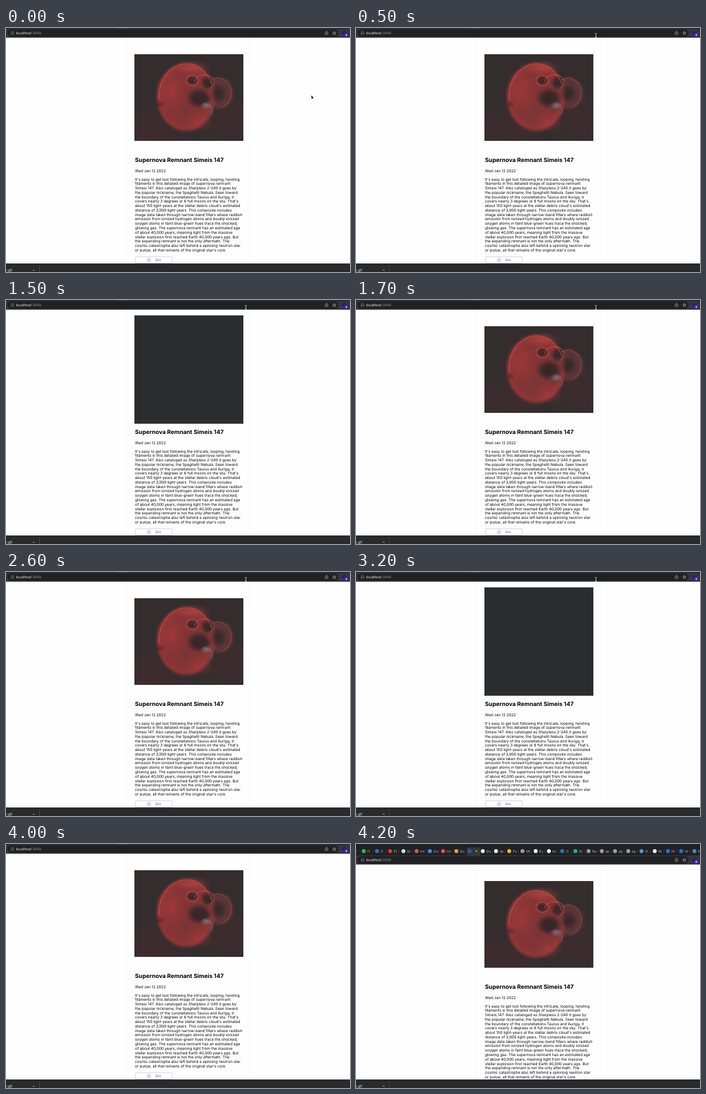
An HTML page with a canvas for the animation above (4.9 s loop, 600 by 428 pixels).

```html
<!DOCTYPE html>
<html lang="en">
<head>
<meta charset="utf-8">
<title>Picture of the day</title>
<style>
html, body { margin: 0; width: 100%; height: 100%; overflow: hidden; background: #fff; }
canvas { display: block; width: 600px; height: 428px; }
</style>
</head>
<body>
<canvas id="stage"></canvas>
<script>
const W = 600, H = 428, LOOP = 4900, TAU = Math.PI * 2;
const FONT = 'Inter, Roboto, sans-serif';
const dpr = window.devicePixelRatio || 1;
const ctx = setup(document.getElementById('stage'), W, H);

function setup(canvas, w, h) {
  canvas.width = w * dpr;
  canvas.height = h * dpr;
  const c = canvas.getContext('2d');
  c.scale(dpr, dpr);
  c.textRendering = 'geometricPrecision';
  return c;
}

// Nebula picture as soft shapes, 190 x 152
const photo = document.createElement('canvas');
paintNebula(setup(photo, 190, 152));

function paintNebula(c) {
  // Elliptic gradient; each stop is [offset, alpha]
  function glow(x, y, rx, ry, rgb, ...stops) {
    c.save();
    c.translate(x, y);
    c.scale(rx, ry);
    const g = c.createRadialGradient(0, 0, 0, 0, 0, 1);
    for (const [at, alpha] of stops) g.addColorStop(at, `rgba(${rgb},${alpha})`);
    g.addColorStop(1, `rgba(${rgb},0)`);
    c.fillStyle = g;
    c.fillRect(-1, -1, 2, 2);
    c.restore();
  }

  function arc(x, y, rx, ry, from, to, color, width) {
    c.beginPath();
    c.ellipse(x, y, rx, ry, 0, from, to);
    c.strokeStyle = color;
    c.lineWidth = width;
    c.stroke();
  }

  c.fillStyle = '#342d2e';
  c.fillRect(0, 0, 190, 152);
  glow(25, 135, 80, 50, '85,42,44', [0, 0.35]);
  glow(165, 115, 60, 50, '85,42,44', [0, 0.3]);

  // Shell with a brighter rim
  glow(90, 75, 54, 63, '165,56,57', [0, 0.62], [0.7, 0.68], [0.88, 0.8]);
  glow(65, 66, 30, 42, '200,60,60', [0, 0.4]);
  glow(100, 24, 34, 14, '210,75,72', [0, 0.45]);
  glow(112, 118, 26, 20, '185,62,62', [0, 0.4]);
  glow(146, 68, 30, 31, '120,58,60', [0, 0.35], [0.75, 0.6]);

  // Cavities
  const dark = '44,36,38';
  glow(113, 77, 23, 19, dark, [0, 0.9], [0.5, 0.8]);
  glow(101, 46, 11, 9, dark, [0, 0.8], [0.5, 0.7]);
  glow(128, 50, 13, 13, dark, [0, 0.85], [0.5, 0.75]);
  glow(146, 69, 15, 17, dark, [0, 0.7], [0.4, 0.6]);
  glow(45, 88, 9, 7, dark, [0, 0.5]);

  // Rims
  const rim = 'rgba(214,88,84,0.55)';
  arc(91, 75, 48, 58, 3.1, 5.9, rim, 1.6);
  arc(101, 46, 11, 9, 0, TAU, rim, 1.4);
  arc(122, 49, 17, 13, 3.2, 7.2, rim, 1.4);
  arc(146, 68, 23, 26, 4.2, 7.6, 'rgba(160,90,92,0.5)', 1.4);

  // Blue-green hues
  glow(125, 90, 11, 7, '130,150,180', [0, 0.6]);
  arc(122, 99, 14, 12, 4.6, 7, 'rgba(120,130,150,0.4)', 1.6);
}

const TABS = [
  ['#25c05a', '(1'], ['#2577b8', '(1'], ['#d93a32', 'Ef'], ['#d5dce5', 'Gi'],
  ['#e0564a', 'Int'], ['#4b86e8', 'Go'], ['#e0564a', 'Int'], ['#ee9c35', 'Du'],
  ['#2b5ba8', ''], ['#e8e8e8', 'Du'], ['#f2f2f2', 'do'], ['#efb632', 'Po'],
  ['#9a9da1', 'htt'], ['#f2f2f2', 'Ec'], ['#f2f2f2', 'kv'], ['#2577b8', '(1'],
  ['#20b48a', 'Gi'], ['#9a9da1', 'Re'], ['#9a9da1', 'ap'], ['#9a9da1', 'ap'],
  ['#9a9da1', 'ap'], ['#4d9ad8', 'Vi'], ['#eeeeee', 'Ni'], ['#2474dc', 'Hi'],
  ['#2474dc', 'Ur'], ['#3b8bd8', 'N']
];

const STORY = [
  "It's easy to get lost following the intricate, looping, twisting",
  'filaments in this detailed image of supernova remnant',
  'Simeis 147. Also cataloged as Sharpless 2-240 it goes by',
  'the popular nickname, the Spaghetti Nebula. Seen toward',
  'the boundary of the constellations Taurus and Auriga, it',
  "covers nearly 3 degrees or 6 full moons on the sky. That's",
  "about 150 light-years at the stellar debris cloud's estimated",
  'distance of 3,000 light-years. This composite includes',
  'image data taken through narrow-band filters where reddish',
  'emission from ionized hydrogen atoms and doubly ionized',
  'oxygen atoms in faint blue-green hues trace the shocked,',
  'glowing gas. The supernova remnant has an estimated age',
  'of about 40,000 years, meaning light from the massive',
  'stellar explosion first reached Earth 40,000 years ago. But',
  'the expanding remnant is not the only aftermath. The',
  'cosmic catastrophe also left behind a spinning neutron star',
  "or pulsar, all that remains of the original star's core."
];

function rect(x, y, w, h, color) {
  ctx.fillStyle = color;
  ctx.fillRect(x, y, w, h);
}

function text(str, x, y, size, color, weight = 400) {
  ctx.font = `${weight} ${size}px ${FONT}`;
  ctx.fillStyle = color;
  ctx.fillText(str, x, y);
}

function dot(x, y, r, color) {
  ctx.fillStyle = color;
  ctx.beginPath();
  ctx.arc(x, y, r, 0, TAU);
  ctx.fill();
}

function box(x, y, w, h, r) {
  ctx.beginPath();
  ctx.roundRect(x, y, w, h, r);
}

function line(color, width, ...paths) {
  ctx.strokeStyle = color;
  ctx.lineWidth = width;
  ctx.beginPath();
  for (const p of paths) {
    ctx.moveTo(p[0], p[1]);
    for (let i = 2; i < p.length; i += 2) ctx.lineTo(p[i], p[i + 1]);
  }
  ctx.stroke();
}

function drawPage(loading) {
  rect(210, 16, 1, 420, '#f7f7f7');
  rect(427, 16, 1, 420, '#f7f7f7');
  if (loading) rect(224, 27, 190, 190, '#2b2c30');
  else ctx.drawImage(photo, 224, 46, 190, 152);

  text('Supernova Remnant Simeis 147', 225, 235.3, 10.1, '#000', 700);
  text('Wed Jan 12 2022', 225, 252.8, 6.58, '#000');
  STORY.forEach((s, i) => text(s, 225, 267.5 + i * 7.77, 6.58, '#000'));

  ctx.strokeStyle = '#b4b4b4';
  ctx.lineWidth = 0.6;
  box(225.4, 401.2, 64.5, 11.2, 1.5);
  ctx.stroke();
  line('#777', 0.6,
    [246.8, 405.8, 246.8, 409.2],
    [248, 409, 248, 406, 249.6, 403.6, 250.4, 404, 250, 405.8, 252.3, 405.8, 251.8, 409, 248, 409]);
  text('like', 260.2, 408.8, 6.4, '#777');
}

function drawTabs() {
  rect(0, -60, W, 61, '#202124');
  ctx.fillStyle = '#35363a';
  box(193, -13, 24, 15, [3, 3, 0, 0]);
  ctx.fill();
  text('(', -1, -4.3, 6, '#b4b7bb');
  TABS.forEach(([color, label], i) => {
    const x = 13.5 + i * 23.07;
    dot(x, -6.5, 3.4, color);
    text(label, x + 6.2, -4.3, 6, '#b4b7bb');
    if (i !== 7 && i !== 8) rect(x + 15.6, -9.5, 0.5, 6, '#4b4d51');
  });
  line('#e8eaed', 0.8, [208.5, -8, 211.5, -5], [211.5, -8, 208.5, -5]);
}

function drawToolbar(badge) {
  rect(0, 0, W, 17, '#35363a');
  ctx.fillStyle = '#202124';
  box(2, 2.3, 578, 13, 6.5);
  ctx.fill();

  ctx.strokeStyle = '#a5a8ac';
  ctx.lineWidth = 0.6;
  ctx.beginPath();
  ctx.arc(11.2, 8.8, 2.6, 0, TAU);
  ctx.stroke();
  line('#a5a8ac', 0.7, [11.2, 8.4, 11.2, 10.3], [11.2, 7, 11.2, 7.6]);
  text('localhost', 17.5, 11, 6.25, '#f1f3f4');
  text(':3000', 44.3, 11, 6.1, '#8d9196');

  line('#c4c7cb', 0.6,
    [558, 7.8, 556.7, 7.8, 556.7, 11.4, 561.3, 11.4, 561.3, 7.8, 560, 7.8],
    [559, 9.8, 559, 5.5], [557.7, 6.8, 559, 5.5, 560.3, 6.8]);
  const star = [];
  for (let i = 0; i <= 10; i++) {
    const a = -Math.PI / 2 + i * Math.PI / 5, r = i % 2 ? 1.4 : 3;
    star.push(572.7 + r * Math.cos(a), 8.9 + r * Math.sin(a));
  }
  line('#dcdfe2', 0.65, star);

  dot(589.8, 8.6, 3.3, '#2b1699');
  if (badge) {
    ctx.fillStyle = '#4325b4';
    box(590.3, 9.3, 6, 6, 1);
    ctx.fill();
    text('4', 591.7, 14.1, 5, '#fff', 600);
  }
}

function drawShelf() {
  rect(0, 413, W, 15, '#292a2d');
  rect(58, 416, 0.7, 12, '#55575b');
  text('e.gif', -2.3, 427, 6.3, '#e8eaed');
  line('#c4c7cb', 0.8, [46.3, 425.8, 48.2, 423.9, 50.1, 425.8]);
}

function drawArrow(x, y) {
  ctx.beginPath();
  [[0, 0], [0, 5.6], [1.3, 4.5], [2.2, 6.5], [3, 6.1], [2.1, 4.2], [3.8, 4.1]]
    .forEach(([dx, dy]) => ctx.lineTo(x + dx, y + dy));
  ctx.closePath();
  ctx.strokeStyle = '#fff';
  ctx.lineWidth = 0.9;
  ctx.stroke();
  ctx.fillStyle = '#000';
  ctx.fill();
}

function drawBeam(x, y) {
  const bar = [x, y - 2.6, x, y + 2.6];
  const top = [x - 1.5, y - 3.3, x, y - 2.6, x + 1.5, y - 3.3];
  const foot = [x - 1.5, y + 3.3, x, y + 2.6, x + 1.5, y + 3.3];
  line('#e6e6e6', 1.1, bar, top, foot);
  line('#333', 0.4, bar);
}

const POINTER = [[0, 532.7, 118.3], [200, 508, 88], [300, 459, 43], [400, 427, 19]];

function drawPointer(t) {
  if (t >= 4000) return;
  if (t >= 500) return drawBeam(418.4, 13);
  const [, x, y] = POINTER.filter(p => p[0] <= t).pop();
  drawArrow(x, y);
}

const within = (t, a, b) => t >= a && t < b;

function draw(t) {
  const shift = t < 4100 ? 0 : t < 4200 ? 11 : 19;
  const loading = within(t, 1400, 1600) || within(t, 3200, 3600);
  const badge = !within(t, 1100, 1500) && !within(t, 2800, 3200);

  rect(0, 0, W, H, '#fefefe');
  ctx.save();
  ctx.translate(0, shift);
  drawPage(loading);
  drawToolbar(badge);
  drawTabs();
  ctx.restore();
  drawShelf();
  drawPointer(t);
}

const start = performance.now();
function tick() {
  draw((performance.now() - start) % LOOP);
  requestAnimationFrame(tick);
}
tick();
</script>
</body>
</html>
```
